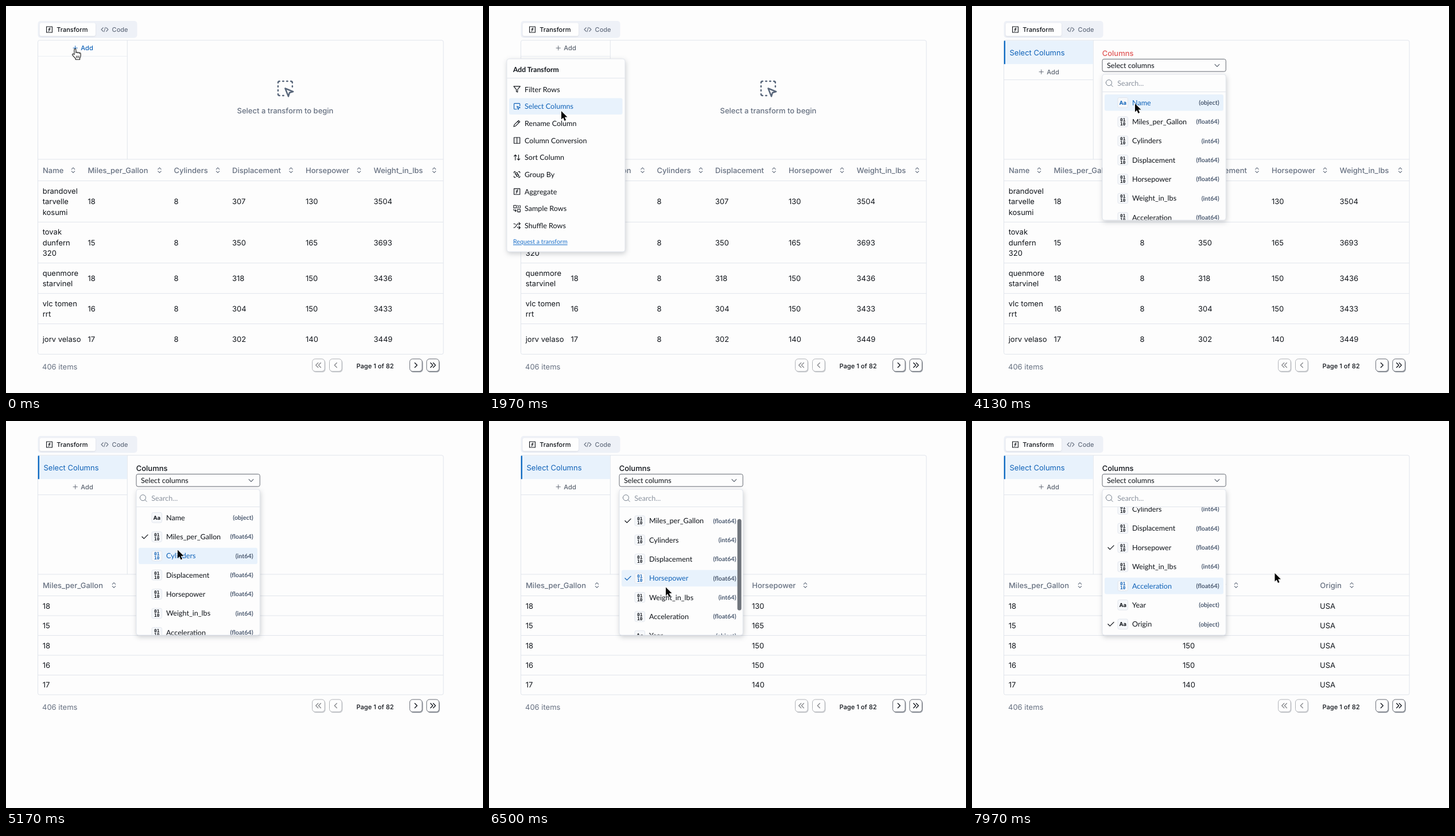
An HTML page for the animation above (8000 ms loop, 831 by 674 pixels).

```html
<!DOCTYPE html>
<html lang="en">
<head>
<meta charset="utf-8">
<title>Transform panel</title>
<style>
html, body { margin: 0; width: 100%; height: 100%; overflow: hidden; background: #fdfdfd; }
svg { display: block; width: 100%; height: 100%; }
text { font-family: Inter, "Liberation Sans", sans-serif; white-space: pre; text-rendering: geometricPrecision; }
text.l { font-family: Lato, "Open Sans", sans-serif; }
text.m { font-family: "DejaVu Sans Mono", monospace; }
.pop { filter: drop-shadow(1px 3px 4px rgba(15, 23, 42, .2)); }
.tab { filter: drop-shadow(0 1px 1px rgba(15, 23, 42, .1)); }
</style>
</head>
<body>
<svg id="stage" viewBox="0 0 831 674" preserveAspectRatio="none"></svg>
<script>
const INK = '#0f1319', SLATE = '#667080', LINE = '#e1e5ec', BLUE = '#0f62b8', TINT = '#e8f2fc', RED = '#e05757';
const EDGE = '#666b74', SHADE = '#9da1a8', IDLE = '#5c6470';
const LOOP = 8000;

// y is the middle of the capitals
function txt(s, x, y, o = {}) {
  const size = o.size || 13;
  return `<text x="${x}" y="${y + size * .36}" font-size="${size}" font-weight="${o.w || 400}" fill="${o.c || INK}"` +
    ` class="${o.f || ''}" text-anchor="${o.a || 'start'}"${o.u ? ' text-decoration="underline"' : ''}>${s}</text>`;
}
const lato = (s, x, y, o = {}) => txt(s, x, y, { size: 12.6, f: 'l', ...o });
const rect = (x, y, w, h, fill, o = '') => `<rect x="${x}" y="${y}" width="${w}" height="${h}" fill="${fill}" ${o}/>`;
const line = (x1, y1, x2, y2, c = LINE) => `<path d="M${x1} ${y1}L${x2} ${y2}" stroke="${c}"/>`;
const group = (id, body, o = '') => `<g id="${id}" ${o}>${body}</g>`;

// icons live on a 24 unit grid
const POINTER = 'M12 12l10 4-4.6 1.4L16 22z';
const ICON = {
  filter: 'M22 3H2l8 9.5V19l4 2v-8.5z',
  select: POINTER + 'M21 11V5q0-2-2-2H5Q3 3 3 5v14q0 2 2 2h6',
  pencil: 'M17 3l4 4L8 20l-6 2 2-6zM14 6l4 4',
  columns: 'M3 3h18v18H3zM12 3v18',
  sort: 'M21 16l-4 4-4-4M17 20V4M3 8l4-4 4 4M7 4v16',
  group: 'M3 7V5q0-2 2-2h2M17 3h2q2 0 2 2v2M21 17v2q0 2-2 2h-2M7 21H5q-2 0-2-2v-2M7 7h7v5H7zM10 12v5h7v-5z',
  func: 'M3 3h18v18H3zM9 17c2 0 2.8-1 2.8-2.8V10c0-2 1-3.3 3.2-3M9 11.2h5.7',
  sample: 'M2 2h8v8H2zM14 14h8v8h-8zM14 2q2 0 2 2v4q0 2-2 2M20 2q2 0 2 2v4q0 2-2 2M10 18H5q-3 0-3-3v-1M7 21l3-3-3-3',
  shuffle: 'M2 18h1.4c1.3 0 2.5-.6 3.3-1.7l6.1-8.6C13.5 6.6 14.8 6 16 6h6M18 2l4 4-4 4M2 6h2c1.5 0 2.8.9 3.5 2.2M22 18h-6c-1.3 0-2.5-.7-3.2-1.8M18 14l4 4-4 4',
  code: 'M17 18l6-6-6-6M7 6l-6 6 6 6M14 5l-4 14',
  updown: 'M7 15l5 5 5-5M7 9l5-5 5 5',
  down: 'M5 9l7 7 7-7',
  left: 'M15 6l-6 6 6 6', right: 'M9 6l6 6-6 6',
  first: 'M11 6l-6 6 6 6M18 6l-6 6 6 6', last: 'M6 6l6 6-6 6M13 6l6 6-6 6',
  check: 'M3 12l6 6L21 6',
  plus: 'M12 5v14M5 12h14',
  search: 'M2 11a9 9 0 1 0 18 0a9 9 0 1 0-18 0M17.5 17.5L23 23',
  pick: POINTER + 'M5 3Q3 3 3 5M19 3q2 0 2 2M5 21q-2 0-2-2M9 3h1M14 3h1M9 21h1M3 9v1M3 14v1M21 9v1'
};
function icon(name, cx, cy, size = 13.2, c = INK, w = 2) {
  const k = size / 24;
  return `<path d="${ICON[name]}" transform="translate(${cx - size / 2} ${cy - size / 2}) scale(${k})" fill="none"` +
    ` stroke="${c}" stroke-width="${w}" stroke-linecap="round" stroke-linejoin="round"/>`;
}

function header(cols) {
  return cols.map(([name, x, ix]) =>
    txt(name, x, 286, { w: 500, c: SLATE }) + icon('updown', ix, 286, 13, SLATE)).join('');
}
function grid(ys, bottom) {
  return rect(55.5, 59.7, 706.5, bottom - 59.7, 'none', `rx="3" stroke="${LINE}"`) +
    [267, 304.5, ...ys].map(y => line(56, y, 762, y)).join('');
}

const MPG = [18, 15, 18, 16, 17], HP = [130, 165, 150, 150, 140];
function fullTable() {
  const xs = [142.5, 292.5, 394, 522, 640.5];
  const rows = [
    [340.7, 'brandovel|tarvelle|kosumi', 307, 3504], [412, 'tovak|dunfern|320', 350, 3693],
    [474.3, 'quenmore|starvinel', 318, 3436], [527.3, 'vlc tomen|rrt', 304, 3433], [580.2, 'jorv velaso', 302, 3449]];
  return grid([376.3, 447.7, 500.7, 553.5], 606.5) +
    header([['Name', 64, 117], ['Miles_per_Gallon', 142.5, 267.5], ['Cylinders', 292.5, 369],
      ['Displacement', 394, 496.5], ['Horsepower', 522, 615], ['Weight_in_lbs', 640.5, 746]]) +
    rows.map(([y, name, disp, lbs], i) => {
      const parts = name.split('|');
      return parts.map((p, j) => txt(p, 63.7, y + (j - (parts.length - 1) / 2) * 18.5)).join('') +
        [MPG[i], 8, disp, HP[i], lbs].map((v, j) => txt(v, xs[j], y)).join('');
    }).join('');
}
// cols: [title, x, sort icon x, values]
function shortTable(cols) {
  return header(cols) + cols.map(([, x, , vals]) =>
    vals.map((v, i) => txt(v, x - .3, 322 + i * 34.45)).join('')).join('');
}

function pager() {
  const btn = (name, x, on) => `<g opacity="${on ? 1 : .5}">` +
    rect(x - 10, 616, 22, 22, SHADE, 'rx="5.5"') +
    rect(x - 11, 614.7, 21.6, 21.6, '#fdfdfd', `rx="5" stroke="${EDGE}"`) +
    icon(name, x - .2, 625.5, 16, '#10141c', 2) + '</g>';
  return txt('406 items', 63, 628, { c: SLATE }) + btn('first', 544.6, 0) + btn('left', 574.5, 0) +
    txt('Page 1 of 82', 610.5, 627.5, { size: 11.1, w: 500 }) + btn('right', 714.4, 1) + btn('last', 743.8, 1);
}

const add = (y, c) => icon('plus', 120.7, y, 12.5, c, 1.8) + txt('Add', 130.3, y, { size: 11.1, w: 500, c });

const MENU = [['filter', 'Filter Rows'], ['select', 'Select Columns'], ['pencil', 'Rename Column'],
  ['columns', 'Column Conversion'], ['sort', 'Sort Column'], ['group', 'Group By'],
  ['func', 'Aggregate'], ['sample', 'Sample Rows'], ['shuffle', 'Shuffle Rows']];
function menu() {
  return rect(31, 92, 206, 336, '#fdfdfd', `rx="4" stroke="${LINE}" class="pop"`) +
    lato('Add Transform', 42, 110.7, { w: 700, size: 12.2 }) + line(31, 125.7, 237, 125.7) +
    MENU.map(([ic, s], i) => {
      const y = 145 + i * 29.7;
      const row = c => icon(ic, 48.7, y, 13.6, c) + lato(s, 62, y, { c });
      return group('m' + i, row(INK)) + group('mh' + i, rect(35, y - 14.2, 197.5, 28.4, TINT, 'rx="3"') + row(BLUE));
    }).join('') +
    lato('Request a transform', 42, 410.5, { size: 10.7, c: '#1a6fc9', u: 1 });
}

const COLS = [['Name', 'object'], ['Miles_per_Gallon', 'float64'], ['Cylinders', 'int64'],
  ['Displacement', 'float64'], ['Horsepower', 'float64'], ['Weight_in_lbs', 'int64'],
  ['Acceleration', 'float64'], ['Year', 'object'], ['Origin', 'object']];
function options() {
  return COLS.map(([name, type], i) => {
    const y = 168.2 + i * 33.35;
    const badge = c => rect(254, y - 8.7, 17.5, 17.5, '#f6f8fb', `rx="2.5" stroke="${LINE}"`) +
      (type === 'object' ? txt('Aa', 262.7, y, { size: 9.5, w: 700, c, a: 'middle' })
        : ['01', '10'].map((s, j) => txt(s, 262.7, y - 3.4 + j * 7, { size: 7.8, w: 700, c, f: 'm', a: 'middle' })).join(''));
    const row = c => badge(c) + lato(name, 279, y, { c }) +
      lato(`(${type})`, 430.6, y, { size: 10.7, w: 700, c: '#4b5a70', a: 'end' });
    const tick = c => icon('check', 242, y, 13.5, c, 2.2);
    return group('o' + i, row(INK)) + group('oh' + i, rect(231, y - 14.2, 207, 28.6, TINT, 'rx="3"') + row(BLUE)) +
      group('c' + i, tick(INK)) + group('ch' + i, tick(BLUE));
  }).join('');
}

document.getElementById('stage').innerHTML =
  '<defs><clipPath id="clip"><rect x="227" y="150" width="215.5" height="222.5"/></clipPath></defs>' +
  rect(0, 0, 831, 674, '#fdfdfd') +
  rect(55.5, 26, 173, 29.5, '#eef1f7', 'rx="5"') + rect(58.5, 29.5, 97.5, 22.7, '#fefefe', 'rx="3.5" class="tab"') +
  icon('func', 75.5, 41, 13.2) + txt('Transform', 88.2, 41, { size: 11, w: 500 }) +
  icon('code', 172, 41, 13, SLATE) + txt('Code', 184.6, 41, { size: 11, w: 500, c: SLATE }) +
  group('full', fullTable()) +
  group('short', grid([339, 373.5, 408, 442.5], 476.8)) +
  group('t1', shortTable([['Miles_per_Gallon', 64, 188, MPG]])) +
  group('t2', shortTable([['Miles_per_Gallon', 64, 188, MPG], ['Horsepower', 458.3, 551, HP]])) +
  group('t3', shortTable([['Miles_per_Gallon', 64, 188, MPG], ['Horsepower', 367.3, 460, HP], ['Origin', 606.3, 661.5, Array(5).fill('USA')]])) +
  group('pager', pager()) +
  line(211.3, 60, 211.3, 267) +
  group('empty', line(56, 87.5, 211, 87.5, '#eceff4') + icon('pick', 486.4, 143.5, 33.3, '#58667a', 1.8) +
    txt('Select a transform to begin', 486.5, 182, { w: 500, c: SLATE, a: 'middle' })) +
  group('addHot', add(73.2, BLUE)) + group('addIdle', add(73.2, IDLE)) +
  group('chosen', rect(56, 60.5, 155, 40.7, TINT) + rect(55.7, 60.5, 2.3, 40.7, '#0f6cc4') +
    txt('Select Columns', 65.5, 81, { c: BLUE }) + add(114.7, IDLE) + line(56, 128.5, 211, 128.5) +
    group('lift', rect(229, 94.5, 215, 21.6, SHADE, 'rx="3.5"')) +
    rect(227, 92.5, 215.3, 21.6, '#fdfdfd', `rx="3" stroke="${EDGE}"`) +
    lato('Select columns', 235, 103.3) + icon('down', 427, 103.3, 13.5, '#4c5563', 1.8)) +
  group('bad', txt('Columns', 226.7, 82.3, { w: 500, c: RED }) +
    txt('At least one column is required', 226.7, 129, { size: 11.3, w: 500, c: RED })) +
  group('good', txt('Columns', 226.7, 82.3, { w: 500 })) +
  group('menu', menu()) +
  group('drop', rect(227, 119, 215.3, 254, '#fdfdfd', `rx="4" stroke="${LINE}" class="pop"`) +
    icon('search', 239, 134.2, 13.5, '#6b7684', 1.7) + lato('Search...', 253.3, 134.2, { c: '#8a929e' }) +
    line(227, 149.5, 442.3, 149.5) +
    group('view', group('list', options()), 'clip-path="url(#clip)"') +
    group('thumb', rect(432.7, 150, 7, 159, '#70757c', 'rx="3.5"'))) +
  group('cursor',
    group('hand', '<path d="M-1.7 10V1.5Q-1.7 0-.2 0t1.5 1.5V7q.1-1.4 1.5-1.4T4.3 7.3Q4.5 6.2 5.7 6.2T7.1 7.8Q7.3 7 8.3 7t1.2 1.5V12q0 2.4-1.5 4v2.6H.6V17L-4.7 11q-.9-1.5.2-2.2t2.8 1.2z" fill="#fff" stroke="#111" stroke-width="1.1" stroke-linejoin="round"/><path d="M2 12v4M4.2 12v4M6.4 12v4" stroke="#111" stroke-width=".9"/>') +
    group('arrow', '<path d="M0 0V14.6l3.3-3.1 2.3 5.4 2.5-1.1-2.3-5.2h4.7z" fill="#050505" stroke="#fff" stroke-width="1.1" stroke-linejoin="round" paint-order="stroke"/>') +
    group('beam', '<path d="M-3-7q2.5 0 3 1.8Q.5-7 3-7M-3 7q2.5 0 3-1.8Q.5 7 3 7M0-5.2V5.2M-1.6 2h3.2" fill="none" stroke="#111" stroke-width="1.2"/>'));

const el = {};
document.querySelectorAll('g[id]').forEach(g => el[g.id] = g);
const show = (id, on) => { el[id].style.display = on ? '' : 'none'; };

// [time, ...values], eased between neighbours
function track(keys, t) {
  let i = 0;
  while (i < keys.length - 1 && t >= keys[i + 1][0]) i++;
  const a = keys[i], b = keys[i + 1] || a;
  const p = b === a ? 0 : Math.max(0, (t - a[0]) / (b[0] - a[0])), e = p * p * (3 - 2 * p);
  return a.slice(1).map((v, j) => v + (b[j + 1] - v) * e);
}
const step = (keys, t) => keys.reduce((v, k) => t >= k[0] ? k[1] : v, -1);

const PATH = [[0, 120.6, 74.6], [560, 120.6, 74.6], [1170, 117, 128], [1400, 120, 147], [1630, 120, 147],
  [1950, 126, 183], [2560, 126, 183], [3130, 287.5, 100], [3500, 287.5, 100], [4130, 284, 170], [4430, 291, 201],
  [4800, 291, 201], [5170, 299, 224.5], [5470, 300, 240], [5950, 307, 290], [6500, 308, 289.5],
  [6950, 311, 343], [7170, 312, 338], [7360, 312, 338], [7950, 527.5, 265]];
const MENU_HOVER = [[1200, 0], [1760, 1]];
const DROP_HOVER = [[3400, 0], [4300, 1], [5100, 2], [5640, 3], [5800, 4], [6830, 8], [7610, 7], [7650, 6]];
const PICKED = { 1: 4650, 4: 6060, 8: 7240 };

function popup(id, t, from, to, ox, oy) {
  const v = Math.min(1, Math.max(0, (t - from) / 140), Math.max(0, (to - t) / 130));
  const k = .95 + .05 * v;
  show(id, v > 0);
  el[id].setAttribute('opacity', v);
  el[id].setAttribute('transform', `translate(${ox * (1 - k)} ${oy * (1 - k)}) scale(${k})`);
}

function draw(t) {
  const chosen = t >= 2540, picked = t >= 4720;
  show('empty', !chosen);
  show('addHot', t < 400);
  show('addIdle', t >= 400 && !chosen);
  show('chosen', chosen);
  show('bad', chosen && !picked);
  show('good', picked);
  show('lift', t < 3400);
  show('full', !picked);
  show('short', picked);
  show('t1', picked && t < 6130);
  show('t2', t >= 6130 && t < 7330);
  show('t3', t >= 7330);
  el.pager.setAttribute('transform', `translate(0 ${picked ? -129.7 : 0})`);

  popup('menu', t, 400, 2640, 133, 92);
  const mh = step(MENU_HOVER, t);
  MENU.forEach((_, i) => { show('m' + i, i !== mh); show('mh' + i, i === mh); });

  popup('drop', t, 3400, 9000, 334, 119);
  const oh = step(DROP_HOVER, t);
  COLS.forEach((_, i) => {
    const on = t >= (PICKED[i] || Infinity);
    show('o' + i, i !== oh);
    show('oh' + i, i === oh);
    show('c' + i, on && i !== oh);
    show('ch' + i, on && i === oh);
  });
  const [scroll] = track([[6370, 0], [6500, 27.8], [6820, 81.3]], t);
  el.list.setAttribute('transform', `translate(0 ${-scroll})`);
  el.thumb.setAttribute('transform', `translate(0 ${scroll * .75})`);
  el.thumb.setAttribute('opacity', track([[6370, 0], [6420, 1], [6990, 1], [7260, 0]], t)[0]);

  const [x, y] = track(PATH, t);
  el.cursor.setAttribute('transform', `translate(${x} ${y})`);
  const beam = t >= 2990 && t < 3430;
  show('hand', t < 430);
  show('beam', beam);
  show('arrow', t >= 430 && !beam);
}

function frame() {
  draw(performance.now() % LOOP);
  requestAnimationFrame(frame);
}
frame();
</script>
</body>
</html>
```
